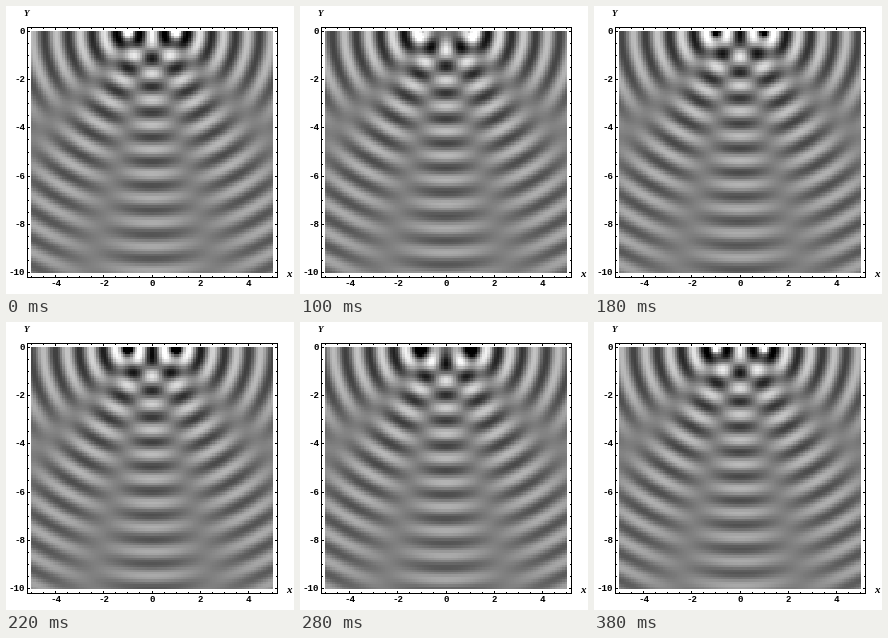
Animation, 288 px wide and 288 px high, one loop 0.4 s. Source, as a matplotlib script:

```python
import numpy as np
import matplotlib.pyplot as plt
from matplotlib.animation import FuncAnimation
from matplotlib.patches import Rectangle

SIZE, DPI = 288, 100
FRAMES, INTERVAL = 20, 20
LEFT, TOP, SPAN = 25, 25, 242          # density area in pixels
ORIGIN, SCALE = 25.5, 24.1             # axis start and pixels per unit
NEAR, FAR = 21, 271                    # frame lines, same on both axes
PX = 72 / DPI                          # one pixel in points

# Two point sources at x = -1 and x = 1 on the top edge, wavelength 1
X, Y = np.meshgrid(np.linspace(-5, 5, 100), np.linspace(0, -10, 100))
DISTANCES = [np.hypot(X - s, Y) for s in (-1, 1)]


def field(phase):
    return sum(np.cos(2 * np.pi * (r - phase)) / np.sqrt(np.maximum(r, 0.02))
               for r in DISTANCES)


def px_x(x):
    return ORIGIN + (x + 5) * SCALE


def px_y(y):
    return ORIGIN - y * SCALE


def bar(x, y, w, h):
    ax.add_patch(Rectangle((x, y), w, h, fc="black", lw=0, snap=False))


def label(x, y, text, ha="center", **font):
    style = dict(family="Liberation Mono", weight="bold", size=9.2 * PX) | font
    ax.text(x, y, text, ha=ha, va="center_baseline", color="black", **style)


def draw_frame():
    length = FAR - NEAR + 1
    for edge in (NEAR, FAR):
        bar(NEAR, edge, length, 1)
        bar(edge, NEAR, 1, length)

    # inward ticks every half unit, longer ones every two units
    for i in range(21):
        x, y = -5 + i / 2, -i / 2
        px, py = int(px_x(x)), int(px_y(y))
        len_x = 2 if x % 2 == 0 else 1
        len_y = 2 if y % 2 == 0 else 1
        bar(px, NEAR + 1, 1, len_x)
        bar(px, FAR - len_x, 1, len_x)
        bar(NEAR + 1, py, len_y, 1)
        bar(FAR - len_y, py, len_y, 1)


def draw_labels():
    for x in range(-4, 5, 2):
        label(px_x(x) + 0.3, 276.5, str(x))
    for y in range(0, -11, -2):
        label(19, px_y(y) - 1, str(y), ha="right")
    serif = dict(family="Liberation Serif", style="italic")
    label(20, 7.3, "Y", size=9 * PX, **serif)
    label(283.2, 267.3, "x", size=11 * PX, **serif)


fig = plt.figure(figsize=(SIZE / DPI, SIZE / DPI), dpi=DPI, facecolor="white")
ax = fig.add_axes([0, 0, 1, 1])
ax.axis("off")
waves = ax.imshow(field(0), cmap="gray", vmin=-2, vmax=2, aspect="auto",
                  interpolation="nearest",
                  extent=(LEFT, LEFT + SPAN, TOP + SPAN, TOP))
draw_frame()
draw_labels()
ax.set(xlim=(0, SIZE), ylim=(SIZE, 0))


def update(i):
    waves.set_data(field(i / FRAMES))
    return [waves]


anim = FuncAnimation(fig, update, frames=FRAMES, interval=INTERVAL,
                     repeat=True, repeat_delay=0, blit=False)
plt.show()
```
